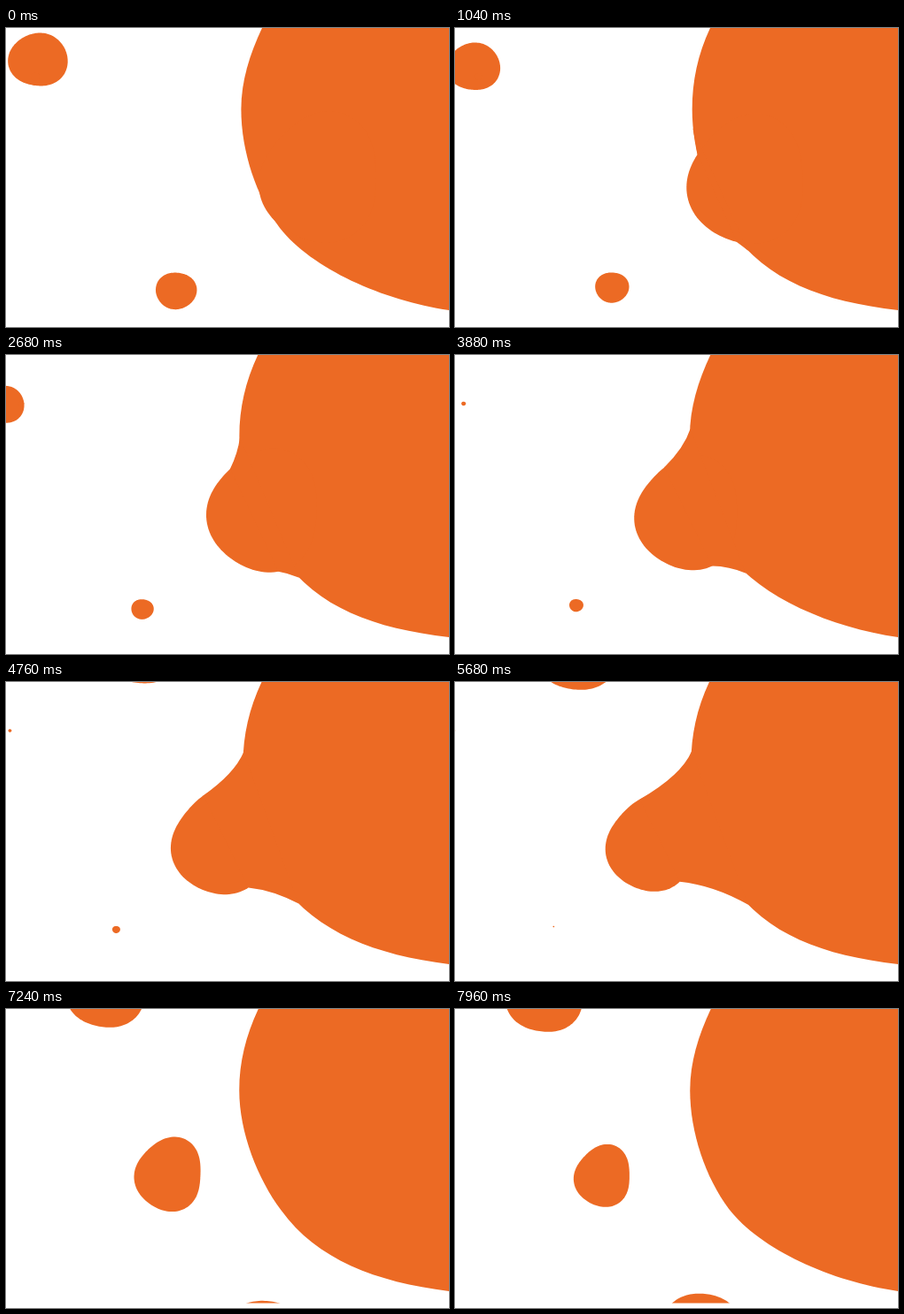
Recreate the animation shown at these times as an HTML page with a canvas. Size 500 by 338 pixels, loop 8000 ms.

```html
<!DOCTYPE html>
<html lang="en">
<head>
<meta charset="utf-8">
<title>Lava blobs</title>
<style>
  html, body { margin: 0; width: 100%; height: 100%; overflow: hidden; background: #fff; }
  canvas { display: block; width: 500px; height: 338px; }
</style>
</head>
<body>
<canvas id="stage" width="500" height="338"></canvas>
<script>
const LOOP = 8, WOBBLE = 4, FLOOR = 332.4;
const NECK_FORMS = 0.48, NECK_SPAN = 5.2, NECK_SNAPS = 6.1;
const { PI, sin, cos, min, sqrt } = Math;
const ctx = document.getElementById('stage').getContext('2d');

// x, y hold at time 0, vx, vy are px/s. The radius r shrinks to nothing over life
// seconds from born. oval and tri are [amount, phase] of the 2nd and 3rd harmonic.
const bud = { x: 355, y: 170, vx: -23.6, vy: 2.4, r: 70, born: 0, life: 11, power: 2,
  oval: [0.063, 2.68], tri: [0.053, -2.8] };
const drifter = { r: 44, life: 15.2, power: 2, oval: [0.06, 0], tri: [0.025, -2.36] };
const pebble = { power: 1, oval: [0.055, 0], tri: [0.02, 1] };

const blobs = [
  bud,
  { ...drifter, x: 36.5, y: 36, vx: -14.6, vy: 7.5, born: -8 },
  { ...drifter, x: 231, y: -79, vx: -16.3, vy: 8.4, born: 4 },
  { ...pebble, x: 192, y: 297, vx: -14.2, vy: -3.6, r: 22, born: 0, life: 5.9 },
  { ...pebble, x: 437, y: 488, vx: -20, vy: -16, r: 48, born: 6.7, life: 10 },
  { ...pebble, x: 33, y: 55, vx: -6, vy: 0, r: 5, born: 0, life: 7.5 }
];

const turn = t => 2 * PI * t / WOBBLE;
const middle = (a, b) => [(a[0] + b[0]) / 2, (a[1] + b[1]) / 2];

function edgePoint(b, angle, t) {
  const size = b.r * (1 - ((t - b.born) / b.life) ** b.power);
  const r = size * (1 + b.oval[0] * cos(2 * angle + b.oval[1])
    + b.tri[0] * cos(3 * angle + b.tri[1] + 0.2 * sin(turn(t))));
  return [b.x + b.vx * t + r * cos(angle), b.y + b.vy * t + r * sin(angle)];
}

function fillBlob(b, t) {
  if (t < b.born || t > b.born + b.life) return;
  const steps = 120;
  ctx.beginPath();
  for (let i = 0; i < steps; i++) ctx.lineTo(...edgePoint(b, 2 * PI * i / steps, t));
  ctx.fill();
}

function bodyAt(t) {
  const sway = sin(turn(t));
  const bulge = min(1, 1.4 * sin(turn(t) / 2 % PI));
  return {
    top: 289 - 3 * bulge + 2 * sway,
    left: 265.4 + 2.3 * sway,
    under: [
      [309 + 2 * bulge, 226 + 2 * bulge],
      [345 + 7 * bulge, 272 + 14 * bulge],
      [425 - 10 * bulge, 308 + bulge],
      [500, 319]
    ]
  };
}

function fillBody({ top, left, under }) {
  const [hip, ...rest] = under;
  ctx.beginPath();
  ctx.moveTo(top, 0);
  ctx.bezierCurveTo(top - 14, 30, left, 60, left, 92);
  ctx.bezierCurveTo(left, 140, hip[0] - 26, hip[1] - 35, ...hip);
  ctx.bezierCurveTo(...rest.flat());
  ctx.lineTo(500, 0);
  ctx.fill();
}

function bezierPoint(points, u) {
  const v = 1 - u;
  const weights = [v ** 3, 3 * v * v * u, 3 * v * u * u, u ** 3];
  return [0, 1].map(axis => weights.reduce((sum, w, i) => sum + w * points[i][axis], 0));
}

// The neck thins as the bud pulls away, then breaks at once.
function fillNeck(body, t) {
  if (t < NECK_FORMS || t > NECK_SNAPS) return;
  const s = (t - NECK_FORMS) / NECK_SPAN;
  const axis = -26 * PI / 180;
  const spread = (150 - 72 * sqrt(s)) * PI / 180;
  const bodyTop = [body.left + 0.7, 122 - 44 * s * (2 - s)];
  const budTop = edgePoint(bud, axis - spread, t);
  const budLow = edgePoint(bud, axis + spread, t);
  const bodyLow = bezierPoint(body.under, 0.15);
  const [upX, upY] = middle(bodyTop, budTop);
  const [lowX, lowY] = middle(budLow, bodyLow);
  ctx.beginPath();
  ctx.moveTo(...bodyTop);
  ctx.quadraticCurveTo(upX + 18 * s * s, upY, ...budTop);
  ctx.lineTo(...budLow);
  ctx.quadraticCurveTo(lowX, lowY - 9 * s * s, ...bodyLow);
  ctx.fill();
}

function draw(t) {
  const body = bodyAt(t);
  ctx.clearRect(0, 0, 500, 338);
  ctx.save();
  ctx.beginPath();
  ctx.rect(0, 0, 500, FLOOR);
  ctx.clip();
  ctx.fillStyle = '#ec6a24';
  fillBody(body);
  blobs.forEach(b => fillBlob(b, t));
  fillNeck(body, t);
  ctx.restore();
}

const start = performance.now();
function frame() {
  draw((performance.now() - start) / 1000 % LOOP);
  requestAnimationFrame(frame);
}
frame();
</script>
</body>
</html>
```
